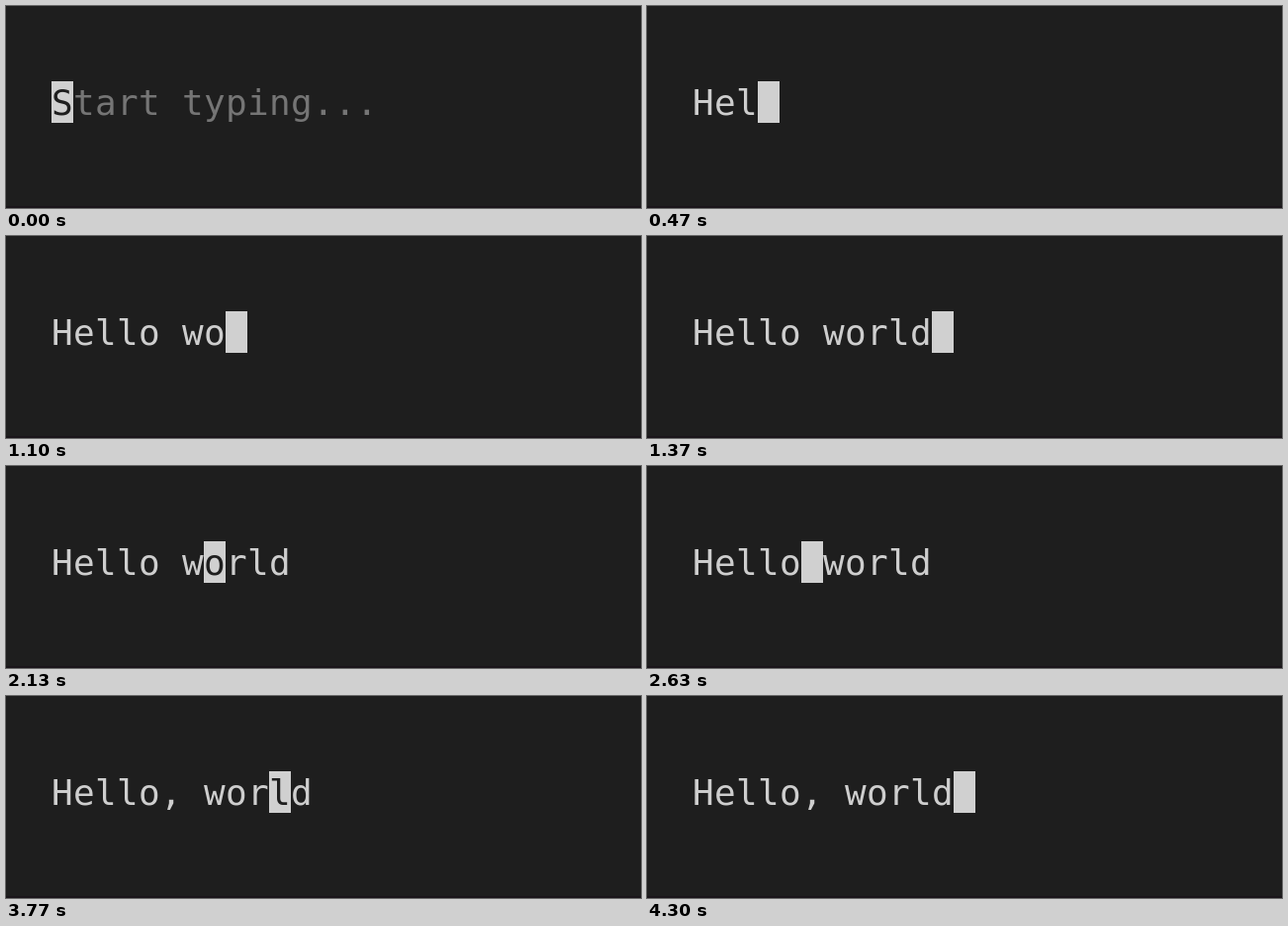
An HTML page with a canvas for the animation above (5.79 s loop, 642 px wide and 204 px high).

```html
<!DOCTYPE html>
<html lang="en">
<head>
<meta charset="utf-8">
<title>Text input</title>
<style>
  html, body { margin: 0; width: 100%; height: 100%; overflow: hidden; background: #1e1e1e; }
  canvas { display: block; }
</style>
</head>
<body>
<canvas width="642" height="204"></canvas>
<script>
const LOOP = 5790;
const CELL = 22, LEFT = 46, TOP = 76, LINE = 42, BASELINE = 110;
const PLACEHOLDER = 'Start typing...';
const BACK = '#1e1e1e', TEXT = '#cecece', DIM = '#757575', CURSOR = '#d0d0d0';

// Key presses: [time in ms, key]; < and > move the cursor.
const KEYS = [
  [270, 'H'], [370, 'e'], [470, 'l'], [570, 'l'], [670, 'o'],
  [930, ' '], [1000, 'w'], [1070, 'o'], [1270, 'r'], [1300, 'l'], [1370, 'd'],
  [1870, '<'], [1970, '<'], [2030, '<'], [2130, '<'], [2270, '<'], [2470, '<'],
  [2930, ','],
  [3470, '>'], [3500, '>'], [3670, '>'], [3770, '>'], [3830, '>'], [3900, '>']
];

const ctx = document.querySelector('canvas').getContext('2d', { alpha: false });

function inputAt(time) {
  let value = '', cursor = 0;
  for (const [at, key] of KEYS) {
    if (at > time) break;
    if (key === '<') cursor--;
    else if (key === '>') cursor++;
    else {
      value = value.slice(0, cursor) + key + value.slice(cursor);
      cursor++;
    }
  }
  return { value, cursor };
}

function draw(time) {
  const { value, cursor } = inputAt(time);
  ctx.fillStyle = BACK;
  ctx.fillRect(0, 0, 642, 204);
  ctx.fillStyle = '#1a151a';
  ctx.fillRect(0, 202, 642, 2);

  ctx.fillStyle = CURSOR;
  ctx.fillRect(LEFT + cursor * CELL, TOP, CELL, LINE);

  ctx.font = '36px "DejaVu Sans Mono", monospace';
  [...(value || PLACEHOLDER)].forEach((char, i) => {
    ctx.fillStyle = i === cursor ? BACK : value ? TEXT : DIM;
    ctx.fillText(char, LEFT + i * CELL, BASELINE);
  });
}

const start = performance.now();
function frame() {
  draw((performance.now() - start) % LOOP);
  requestAnimationFrame(frame);
}
frame();
</script>
</body>
</html>
```
